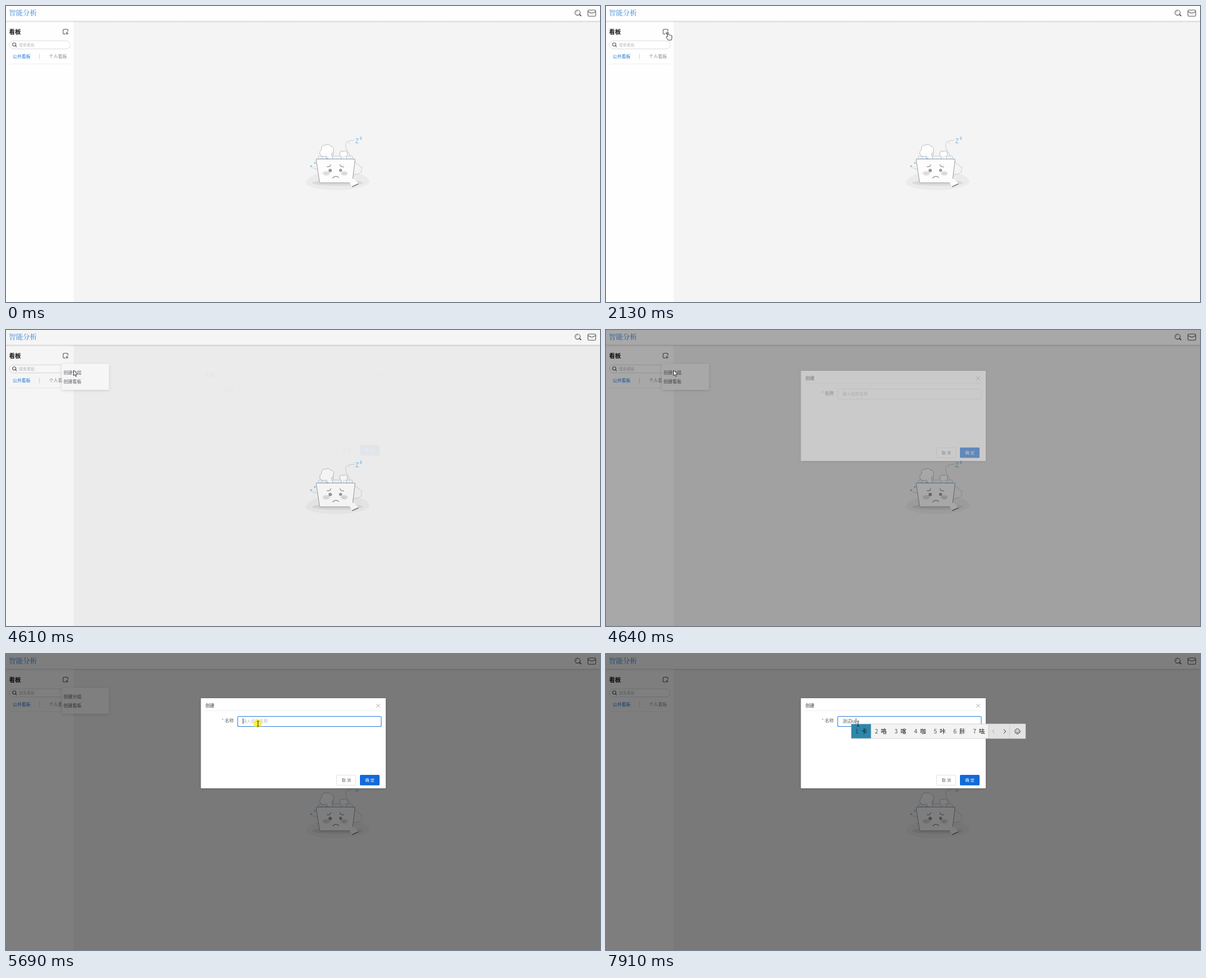
Write an HTML page that moves like this. It is 1059 px wide and 529 px high and loops after 8000 ms.

```html
<!DOCTYPE html>
<html lang="zh-CN">
<head>
<meta charset="utf-8">
<title>智能分析</title>
<style>
  html, body { margin: 0; width: 100%; height: 100%; overflow: hidden; background: #f4f4f4; }
  svg { display: block; }
  text { font-family: "Noto Sans CJK SC", "Noto Sans CJK JP", "Noto Sans CJK", sans-serif; font-size: 8px; white-space: pre; }
  .line { fill: none; stroke-linecap: round; stroke-linejoin: round; }
  .icon { stroke: #555; stroke-width: 1.1; }
  .soft { stroke: #b9b9b9; stroke-width: .7; }
  .face { stroke: #8e8e8e; stroke-width: 1.3; }
  .blue { stroke: #62b0ea; stroke-width: .9; }
  .small { font-size: 7.5px; }
  .hint { fill: #b9bcc4; }
</style>
</head>
<body>
<svg width="1059" height="529" viewBox="0 0 1059 529">
  <defs>
    <linearGradient id="edge" x2="0" y2="1">
      <stop stop-color="#000" stop-opacity=".14"/>
      <stop offset="1" stop-color="#000" stop-opacity="0"/>
    </linearGradient>
    <filter id="shadow" x="-20%" y="-30%" width="140%" height="160%">
      <feDropShadow dx="0" dy="1" stdDeviation="2.5" flood-opacity=".16"/>
    </filter>
  </defs>

  <rect width="1059" height="529" fill="#f4f4f4"/>
  <rect width="120.5" height="529" fill="#fefefe"/>
  <rect width="1059" height="27" fill="#fefefe"/>
  <rect y="26.5" width="1059" height="3.5" fill="url(#edge)"/>
  <text x="5" y="17.2" style="font-family:'Noto Serif CJK SC','Noto Sans CJK SC','Noto Sans CJK JP',serif;font-size:12.5px;font-weight:700" fill="#7cafe6">智能分析</text>

  <!-- header icons -->
  <g class="line icon">
    <circle cx="1019" cy="11.8" r="4.6"/>
    <path d="M1016.4 11.4Q1016.8 9.4 1018.8 9.2" stroke-width=".7"/>
    <path d="M1022.6 15.2L1025 17.5" stroke-width="1.8"/>
    <rect x="1037.5" y="7.2" width="13.8" height="11" rx="1.8"/>
    <path d="M1037.7 10.2Q1040.5 10.7 1042.4 12.2Q1044.4 13.4 1046.4 12.2Q1048.4 10.7 1051.1 10.2"/>
  </g>

  <!-- sidebar -->
  <text x="5.5" y="50" font-weight="700" style="font-size:10.5px" fill="#111">看板</text>
  <g class="line icon">
    <path d="M105.3 50.1H104Q101.8 50.1 101.8 47.9V43.7Q101.8 41.5 104 41.5H108.2Q110.4 41.5 110.4 43.7V45.3"/>
    <path d="M108.7 46.6V51M106.5 48.8H110.9"/>
  </g>
  <rect x="6" y="62.3" width="108.5" height="14.4" rx="7.2" fill="#fff" stroke="#d6d8de" stroke-width=".9"/>
  <g class="line icon" stroke-width=".9">
    <circle cx="14.7" cy="68.8" r="3"/>
    <path d="M17 71.1L18.8 72.9" stroke-width="1.3"/>
  </g>
  <text x="23" y="72.3" class="hint" style="font-size:7px">搜索看板</text>
  <text x="11.8" y="93" fill="#2578d4">公共看板</text>
  <path d="M59.5 85.5V95" stroke="#cfcfcf" stroke-width=".9"/>
  <text x="76.8" y="93" fill="#8b8d92">个人看板</text>
  <path d="M6 103.5H114.5" stroke="#ececec" stroke-width=".9"/>

  <!-- sleepy folder -->
  <path d="M534 319Q536 307 546 304Q552 299 562 300H630Q646 304 648 314Q644 322 630 324Q612 329 588 329Q556 328 544 323Z" fill="#ebebeb"/>
  <ellipse cx="591" cy="316" rx="45.5" ry="5.2" fill="#dadada"/>
  <path class="line soft" d="M621 240Q607 240 605.5 247Q605 253 610 261Q617 275 625 281Q635 287 634 294Q633 301 619 301M554 291.5L546.5 289" stroke-dasharray="3 .7"/>
  <path d="M557 274V269Q557 268 558 268H616.5Q617.5 268 617.5 269V274Z" fill="#eef4fb" stroke="#a9c9e6" stroke-width=".8"/>
  <g fill="#fdfdfd" stroke="#ababab" stroke-width=".8" stroke-linejoin="round">
    <path d="M573 274L571.5 268Q565 271 561 267Q557 261 562.5 257Q561 249 569 248.5Q575 246 579 250.5Q586 252 583.5 259Q583.5 264 580 264L583 274Z"/>
    <path d="M597.5 274L598 269Q593.5 267 595 263Q596 258.500 601 260Q606 257 608.500 262Q610 267 606 269L608 274Z"/>
    <path d="M554 273.500H621Q622.500 273.500 622.300 275L617.500 314.500Q617.300 316 616 316H560.500Q559.300 316 559 314.700L553 275Q552.800 273.500 554 273.500Z" stroke="#999" stroke-width="1"/>
  </g>
  <path class="line blue" d="M562 272.500L565 269M570 272.500H575M583.500 262V267M601 271L604 268.500" opacity=".7"/>
  <ellipse cx="571" cy="299" rx="6.6" ry="4" fill="#e2e2e2"/>
  <ellipse cx="603" cy="299" rx="6.400" ry="4" fill="#e2e2e2"/>
  <path class="line" d="M568 299.300H574" stroke="#bcbcbc" stroke-width=".9" stroke-dasharray="1 2"/>
  <path class="line" d="M601 298.500L602 301M604 298.500L605 301" stroke="#b2b2b2" stroke-width=".8"/>
  <circle cx="578" cy="294" r="3" fill="#979797"/>
  <circle cx="596.500" cy="293.700" r="2.600" fill="#979797"/>
  <path class="line face" d="M572.500 287.300Q578 288 579 283.700M595.500 283.700Q596.500 288 602 287.500M582.500 307.300Q587.500 302 593 306.300"/>
  <path d="M610.500 311L620 308.500L629 317.500L617 323.500Z" fill="#fcfcfc"/>
  <path class="line" d="M617.500 322.700L628 318" stroke="#777" stroke-width="1.500"/>
  <path class="line blue" d="M542.500 286.300H545.700M544.100 284.700V287.900M549.400 280.500H552M550.700 279.200V281.800" stroke-width="1.100"/>
  <path class="line blue" d="M623.700 237.200H628.300L623.500 244.700H628.500M631.500 234.300H634L631.400 238.200H634.200"/>
  <path class="line soft" d="M611 245H612.500M635 287.700H636"/>

  <g id="menu">
    <rect x="99.500" y="60.500" width="84" height="46.500" rx="1.500" fill="#fff" filter="url(#shadow)"/>
    <text x="102.400" y="78.700" fill="#5d5f64">创建分组</text>
    <text x="102.400" y="94.600" fill="#5d5f64">创建看板</text>
  </g>

  <rect id="mask" width="1059" height="529"/>

  <g id="dialog">
    <rect x="347.500" y="79" width="329.500" height="161" rx="1" fill="#fff" filter="url(#shadow)"/>
    <text x="355.500" y="94.800" fill="#303133">创建</text>
    <path class="line" d="M660.400 89.500L666.400 95.500M666.400 89.500L660.400 95.500" stroke="#8f9399" stroke-width=".9"/>
    <path d="M355 101.500H669.500" stroke="#eee" stroke-width=".9"/>
    <text x="384.500" y="122" fill="#98949c">*</text>
    <text x="390" y="121.800" fill="#606266">名称</text>
    <rect id="field" x="413" y="111.500" width="256" height="18" rx="2" fill="#fff"/>
    <text id="hint" class="small hint" x="421.800" y="123.300">输入组的名称</text>
    <text id="value" class="small" x="421.800" y="123.300" fill="#606266"></text>
    <path id="caret" d="M422.500 115V125" stroke="#222" stroke-width=".8"/>
    <rect x="589.500" y="216.500" width="34.200" height="18" rx="1.500" fill="#fff" stroke="#dcdfe6" stroke-width=".9"/>
    <text x="598.500" y="228.300" letter-spacing="2" fill="#606266" style="font-size:7.2px">取消</text>
    <rect x="631" y="216" width="35" height="18.700" rx="1.500" fill="#126bda"/>
    <text x="640.500" y="228.300" letter-spacing="2" fill="#fff" font-weight="500" style="font-size:7.2px">确定</text>
  </g>

  <g id="ime">
    <rect id="imeBox" y="125" height="26" fill="#f3f3f3" stroke="#c9c9c9" stroke-width=".8"/>
    <rect id="imePick" y="125.300" height="25.400" fill="#2e86a9"/>
    <g id="imeWords"></g>
    <g id="imeTail">
      <rect y="125.300" width="65.700" height="25.400" fill="#e2e2e2"/>
      <path d="M0 125.300V150.700M37.500 125.300V150.700" stroke="#c4c4c4" stroke-width=".8"/>
      <path class="line" d="M10 135L7 138.300L10 141.600" stroke="#aaa"/>
      <path class="line" d="M27.500 135L30.700 138.300L27.500 141.600" stroke="#222"/>
      <g class="line" stroke="#222" stroke-width=".9">
        <circle cx="51.500" cy="138.300" r="4.500"/>
        <path d="M49.200 139.500Q51.500 142 53.800 139.500M49.900 136.800V137M53.100 136.800V137"/>
      </g>
    </g>
  </g>

  <circle id="press" r="7.200" fill="#f6ec1c" opacity=".8"/>
  <g id="pointer">
    <path id="arrow" d="M0 0V9.600L2.200 7.600L3.800 11.200L5.300 10.500L3.700 7.100H6.800Z" fill="#fff" stroke="#111" stroke-width=".8" stroke-linejoin="round"/>
    <path id="hand" d="M-.6 7.800V1.400Q-.6 .2 .5 .2Q1.600 .2 1.600 1.400V4.800Q2.700 4.200 3.600 5Q4.800 4.500 5.500 5.500Q7.400 5.200 7.500 7V10Q7.400 12 6.300 14H.8Q-.4 11.800 -2.300 9.600Q-3.200 8.200 -2.200 7.700Q-1.400 7.400 -.6 8.400Z" fill="#fff" stroke="#222" stroke-width=".9" stroke-linejoin="round"/>
    <path id="beam" class="line" d="M-1.500 -4.500H-.4L0 -4L.4 -4.500H1.500M0 -4V4M-1.500 4.500H-.4L0 4L.4 4.500H1.500" stroke="#111" stroke-width=".9"/>
  </g>
</svg>

<script>
const LOOP = 8000;
const $ = id => document.getElementById(id);
const set = (id, attrs) => { for (const k in attrs) $(id).setAttribute(k, attrs[k]); };
const show = (id, on) => set(id, { visibility: on ? "visible" : "hidden" });
const clamp = v => Math.min(1, Math.max(0, v));
const ramp = (t, a, b) => clamp((t - a) / (b - a));
const mix = (a, b, k) => a.map((v, i) => v + (b[i] - v) * k);
const smooth = k => k * k * (3 - 2 * k);

// CSS "ease": cubic-bezier(.25, .1, .25, 1)
function ease(x) {
  let lo = 0, hi = 1;
  const curve = (s, p, q) => 3 * s * (1 - s) ** 2 * p + 3 * s * s * (1 - s) * q + s ** 3;
  for (let i = 0; i < 24; i++) {
    const mid = (lo + hi) / 2;
    if (curve(mid, .25, .25) < x) lo = mid; else hi = mid;
  }
  return curve(lo, .1, 1);
}

const ENTRY = [1015, 527], ADD = [110, 47], ITEM = [120.5, 72], FIELD = [449.3, 124.5];
const PRESSES = [[3110, 3310, 111, 47.5], [4340, 4570, 120, 73], [5550, 5770, 448.7, 124.5]];

// [time, typed text]
const TYPING = [
  [0, ""], [6750, "c"], [7110, "ce"], [7200, "ces"], [7290, "cesh"], [7380, "ceshi"],
  [7470, "测试"], [7780, "测试k"], [7910, "测试ka"]
];

// [time, left edge, candidates]; an empty list closes the window
const WORDS = [
  [0, 0, ""],
  [6850, 422, "才 从 次 出 错 曾 层"],
  [7110, 422, "册 测 侧 策 厕 恻 测"],
  [7200, 422, "测试 侧手 测算 策士 测速 侧室 测深"],
  [7380, 422, "测试 侧室 测时 策士 侧视 策试 侧石"],
  [7470, 0, ""],
  [7840, 437, "看 可 卡 开 快 口 靠"],
  [7910, 437, "卡 咯 喀 咖 咔 胩 呿"]
];
const latest = (list, t) => list.filter(row => row[0] <= t).pop();

function pointerAt(t) {
  if (t < 3640) {
    const tau = 460, end = Math.exp(-1890 / tau);
    const left = (Math.exp(-(t - 240) / tau) - end) / (1 - end);
    return mix(ADD, ENTRY, clamp(left));
  }
  if (t < 4800) return mix(ADD, ITEM, smooth(ramp(t, 3640, 3820)));
  return mix(ITEM, FIELD, smooth(ramp(t, 4800, 5530)));
}

function drawPointer(t) {
  const [x, y] = pointerAt(t);
  const kind = t >= 2070 && t < 3700 ? "hand" : x > 413 && y > 111 && t > 4800 ? "beam" : "arrow";
  set("pointer", { transform: `translate(${x} ${y})`, display: t < 240 ? "none" : "inline" });
  for (const id of ["arrow", "hand", "beam"]) show(id, id === kind);
  const press = PRESSES.find(([a, b]) => t >= a && t < b);
  show("press", press);
  if (press) set("press", { cx: press[2], cy: press[3] });
}

// The dialog opens in coarse steps
function dialogAge(t) {
  if (t < 4610) return 0;
  return t < 4640 ? 17 : 80 + Math.floor((t - 4640) / 30) * 30;
}

function drawDialog(t) {
  const age = dialogAge(t), k = ease(clamp(age / 300));
  set("mask", { opacity: .5 * ease(clamp(age / 200)) });
  set("dialog", { opacity: k, transform: `translate(0 ${-11 * (1 - k)})`, display: age ? "inline" : "none" });

  const focus = t >= 5550;
  set("field", { stroke: focus ? "#2c79dc" : "#dcdfe6", "stroke-width": focus ? 1.1 : .9 });
  const text = latest(TYPING, t)[1];
  $("value").textContent = text;
  show("hint", !text);
  const width = text ? $("value").getComputedTextLength() : 0;
  set("caret", { transform: `translate(${width} 0)` });
  show("caret", focus && (t < 6080 || t >= 6600));
}

let shown;
function drawIme(t) {
  const row = latest(WORDS, t), [, x, list] = row;
  set("ime", { display: list ? "inline" : "none" });
  if (row === shown || !list) return;
  shown = row;
  const words = list.split(" ");
  const cell = words[0].length > 1 ? 45.3 : 35;
  const tail = x + cell * words.length;
  set("imeBox", { x: x + .4, width: tail + 65.5 - x });
  set("imePick", { x: x + .4, width: cell });
  set("imeTail", { transform: `translate(${tail} 0)` });
  $("imeWords").innerHTML = words.map((word, i) => {
    const left = x + i * cell;
    const dim = i ? "#555" : "#1b4657";
    return `<text x="${left + 7.3}" y="142" fill="${dim}" style="font-size:10.5px;font-weight:300">${i + 1}</text>` +
      `<text x="${left + 18}" y="142" fill="#111" style="font-size:10.5px">${word}</text>`;
  }).join("");
}

function draw(t) {
  set("menu", { opacity: ramp(t, 3290, 3380) * (1 - ramp(t, 5780, 5870)) });
  drawDialog(t);
  drawIme(t);
  drawPointer(t);
}

function tick() {
  draw(performance.now() % LOOP);
  requestAnimationFrame(tick);
}
tick();
</script>
</body>
</html>
```
